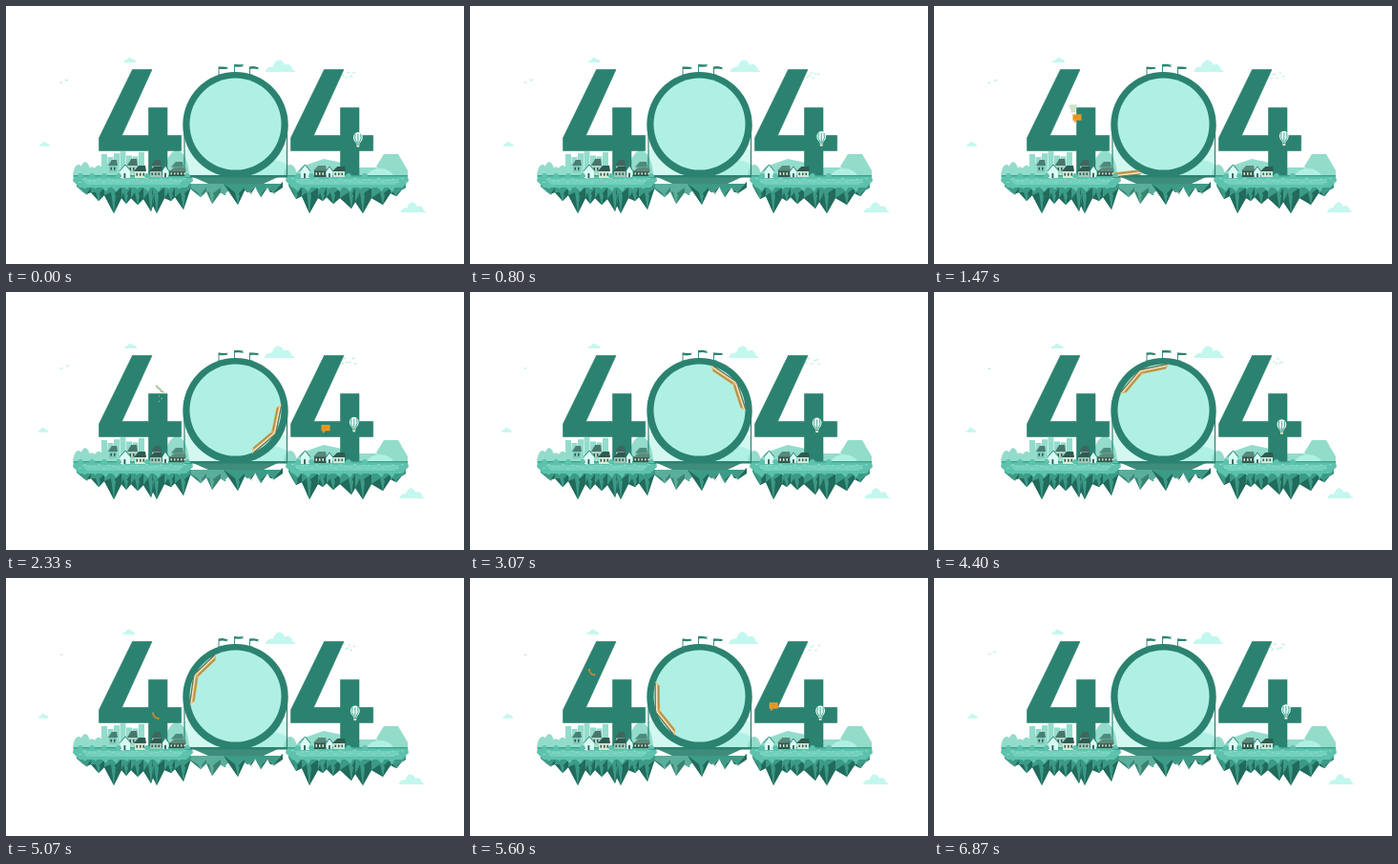
Recreate the animation shown at these times as an HTML page with a canvas. Size 480 px wide and 270 px high, loop 6.94 s.

```html
<!DOCTYPE html>
<html lang="en">
<head>
<meta charset="utf-8">
<title>404</title>
<style>
html, body { margin: 0; width: 100%; height: 100%; overflow: hidden; background: #fff; }
canvas { display: block; width: 480px; height: 270px; }
</style>
</head>
<body>
<canvas id="stage" width="480" height="270" role="img" aria-label="404"></canvas>
<script>
const LOOP = 6940, TAU = Math.PI * 2;
const c = document.getElementById('stage').getContext('2d');
const DARK = '#2b8270', DEEP = '#216a5c', ROCK = '#3c9a86', MID = '#5cc2ad', SOFT = '#93dccb',
      MINT = '#b0f0e4', PALE = '#c4f7ee', INK = '#2f5a51', CREAM = '#f2ead0', ORANGE = '#f09a24';

function poly(color, ...p) {
  c.fillStyle = color;
  c.beginPath();
  for (let i = 0; i < p.length; i += 2) c.lineTo(p[i], p[i + 1]);
  c.fill();
}
function rect(color, x, y, w, h) { c.fillStyle = color; c.fillRect(x, y, w, h); }
function oval(color, x, y, rx, ry = rx, from = 0, to = TAU) {
  c.fillStyle = color;
  c.beginPath();
  c.ellipse(x, y, rx, ry, 0, from, to);
  c.fill();
}
function dome(color, x, y, rx, ry) { oval(color, x, y, rx, ry, Math.PI, TAU); }
function line(color, width, ...p) {
  c.strokeStyle = color;
  c.lineWidth = width;
  c.beginPath();
  for (let i = 0; i < p.length; i += 2) c.lineTo(p[i], p[i + 1]);
  c.stroke();
}
function at(x, y, angle, draw) {
  c.save();
  c.translate(x, y);
  c.rotate(angle);
  draw();
  c.restore();
}

function cloud(x, y, w) {
  dome(PALE, x - w * .27, y, w * .2, w * .17);
  dome(PALE, x - w * .04, y, w * .22, w * .38);
  dome(PALE, x + w * .22, y, w * .18, w * .25);
  poly(PALE, x - w * .5, y, x - w * .32, y - w * .1, x + w * .35, y - w * .1, x + w * .5, y);
}
function clouds(a) {
  cloud(287.5 + Math.sin(a * 2), 69, 33);
  cloud(130 + Math.sin(a), 59, 14);
  cloud(39.5 + Math.cos(a), 146.5, 12);
  cloud(426 + Math.cos(a * 2), 216, 28);
}
function bird(x, y, size, flap) {
  line('#8ce0d0', .8, x - size, y - flap, x, y, x + size, y - flap);
}
function birds(t) {
  const flap = .8 + .7 * Math.sin(t / 90);
  bird(58, 80.5, 1.2, flap);
  if (t < 2900 || t > 6100) bird(63.5 + Math.sin(t / 1100), 78, 1.6, flap);
  for (let i = 0; i < 6; i++)
    bird(353 + i * 2.5 + Math.sin(t / 700 + i), 73 + 3 * Math.sin(i * 2.3 + t / 1100), 1, flap);
}

function backdrop() {
  for (let i = 0; i < 6; i++) dome(SOFT, 76 + i * 7, 179, 6, 13 + 3 * Math.sin(i * 2));
  for (let i = 0; i < 7; i++) rect(SOFT, 100 + i * 6.5, 155 + 3 * Math.sin(i * 1.7), 6, 24);
  rect('#d3f8f0', 187, 150, 107, 29);
  dome(SOFT, 179, 179, 13, 28);
  dome(MINT, 264, 179, 40, 20);
  dome(SOFT, 298, 179, 7, 13);
  poly(SOFT, 300, 179, 310, 168, 333, 160, 352, 164, 370, 169, 388, 169, 400, 179);
  poly('#93dcc9', 388, 168, 396, 155, 411, 155, 421, 172, 421, 179, 398, 179);
  dome(MINT, 392, 179, 14, 9);
}

function four(dx) {
  c.save();
  c.translate(dx, 0);
  const shape = [132.5, 66.5, 153, 66.5, 121.5, 135.5, 149.5, 135.5, 149.5, 106.5, 169, 106.5,
    169, 135.5, 183.7, 135.5, 183.7, 151.5, 169, 151.5, 169, 178, 149.5, 178, 149.5, 151.5,
    97.5, 151.5, 97.5, 138];
  poly(DARK, ...shape);
  line(DARK, .6, ...shape, 132.5, 66.5);
  c.restore();
}
function ring() {
  line(DARK, 1.2, 187, 124, 187, 180);
  line(DARK, 1.2, 294.5, 124, 294.5, 180);
  oval(DARK, 240.5, 124.3, 55.2);
  oval(MINT, 240.5, 123.6, 48);
}
function flag(x, y, t) {
  line(DARK, .9, x, y, x, 72);
  const w = .8 * Math.sin(t / 130 + x);
  poly(DARK, x, y, x + 4, y + w * .6, x + 10, y + .6 - w * .5, x + 8, y + 1.6,
    x + 10, y + 2.6 - w * .5, x + 4, y + 2.4 + w * .6, x, y + 2.6);
}

// Points alternate between notches and tips along the underside
function rock(color, facet, p) {
  poly(color, p[0], 186, ...p, p.at(-2), 186);
  for (let i = 2; i < p.length - 2; i += 4) {
    const [x, y, nx, ny] = p.slice(i, i + 4);
    poly(facet, x, y, nx, ny, nx, 190, x + 1, 196);
    poly(facet, x, y, p[i - 2], p[i - 1], x - 3, 195);
    poly(color, x, y, x - 2, 194, x + 2, 198);
  }
}
function island(x1, x2) {
  for (let x = x1 + 10; x < x2 - 8; x += 11)
    poly(MID, x - 6, 187, x + 6, 187, x + 2, 193 + 2 * Math.sin(x));
  poly(MID, x1, 178, x2, 178, x2 + 1, 183, x2 - 6, 190, x1 + 6, 190, x1 - 1, 183);
  poly('#72d0bc', x1 + 8, 181, x2 - 8, 181, x2 - 14, 187, x1 + 14, 187);
  rect('#3fa28d', x1, 177, x2 - x1, 1.4);
  for (let x = x1 + 5; x < x2 - 5; x += 5) rect(SOFT, x, 182 + 2 * Math.sin(x * 3), 3, .9);
}
function ground() {
  // Shadowed rocks joining the two islands
  rock('#5aae9c', '#3b8372', [188, 187, 204, 200, 210, 194, 216, 207, 225, 195, 229, 198, 237, 186]);
  rock(ROCK, DEEP, [228, 186, 243, 208, 250, 193, 256, 194, 261, 189, 267, 200, 274, 190, 280, 195, 290, 184]);
  poly('#3e8c7b', 196, 179, 285, 179, 270, 186, 212, 186);

  rock(ROCK, DEEP, [74, 189, 84, 197, 89, 195, 97, 204, 103, 198, 113, 217, 121, 201, 126, 207,
    131, 201, 138, 208, 144, 202, 152, 215, 154, 209, 158, 217, 166, 201, 173, 204, 177, 200, 186, 213, 194, 189]);
  rock(ROCK, DEEP, [296, 188, 304, 202, 310, 199, 318, 217, 327, 201, 332, 204, 336, 200, 343, 207,
    350, 201, 362, 212, 366, 205, 374, 217, 383, 201, 395, 208, 403, 196, 409, 199, 419, 188]);
  island(71, 195);
  island(294, 421);
  rect(DARK, 187, 177, 108, 2.5);
}

function house(x, y, w, h, wall, roof) {
  rect(wall, x, y + h * .4, w, h * .6);
  poly(roof, x - 1, y + h * .46, x + w * .35, y, x + w, y, x + w + 1, y + h * .46);
  for (let i = x + 1.5; i < x + w - 1; i += 3.5)
    rect(wall === INK ? CREAM : INK, i, y + h * .6, 1.5, h * .22);
}
function cottage(x, y, w, h) {
  rect('#d9fbf3', x, y + h * .4, w, h * .6);
  poly('#d9fbf3', x, y + h * .45, x + w / 2, y, x + w, y + h * .45);
  line(DARK, 1, x - 1, y + h * .48, x + w / 2, y, x + w + 1, y + h * .48);
  rect(INK, x + w * .35, y + h * .65, 1.8, h * .35);
}
function village() {
  house(108, 161, 8, 13, '#7fcbb9', '#4a7f72');
  house(128, 160, 9, 15, '#a9d4c4', '#4a766a');
  house(153, 161, 9, 14, '#92cbb9', '#3d675d');
  house(174, 163, 11, 12, '#77baa9', '#4d8c7d');
  cottage(120, 166, 10, 14);
  house(135, 167, 11, 13, '#d8e9d4', INK);
  house(151, 168, 12, 11, '#9fc7b4', INK);
  cottage(164, 167, 6, 12);
  house(171, 169, 17, 9, INK, '#5c8b7b');
  cottage(309, 166, 9, 14);
  house(323, 167, 12, 12, INK, '#5a897c');
  cottage(336, 168, 6, 11);
  house(343, 168, 12, 11, '#cbe8d7', INK);
  for (const x of [78, 90, 103, 118, 148, 190, 306, 320, 359, 376]) dome(MID, x, 179, 3, 4);
}

// Travel along the loop: [time, distance from its lowest point]
const RUN = [[1210, -84], [1470, -54], [2330, 48], [3800, 146], [5070, 197], [5600, 235], [6700, 378]];
const R = 46.5, TURN = TAU * R;
function slope(i) {
  const a = RUN[Math.max(0, i - 1)], b = RUN[Math.min(RUN.length - 1, i + 1)];
  return (b[1] - a[1]) / (b[0] - a[0]);
}
function travel(t) {
  const i = RUN.findIndex((k, n) => n < RUN.length - 1 && t >= k[0] && t < RUN[n + 1][0]);
  if (i < 0) return null;
  const [t0, s0] = RUN[i], [t1, s1] = RUN[i + 1], d = t1 - t0, u = (t - t0) / d;
  const ease = u * u * (3 - 2 * u);
  return s0 + (s1 - s0) * ease + d * u * (1 - u) * ((1 - u) * slope(i) - u * slope(i + 1));
}
function track(s) {
  if (s >= 0 && s <= TURN) return [240.5 + R * Math.sin(s / R), 123.6 + R * Math.cos(s / R)];
  const off = s < 0 ? s : s - TURN, k = Math.min(1, Math.abs(off) / 46);
  return [240.5 + off, 123.6 + R + 7 * k * k * (3 - 2 * k)];
}
function car(s, nose) {
  const [x1, y1] = track(s - 15), [x2, y2] = track(s + 15);
  at((x1 + x2) / 2, (y1 + y2) / 2, Math.atan2(y2 - y1, x2 - x1), () => {
    c.scale(nose, 1);
    poly('#d9a954', -15, -2.6, 11, -2.6, 16, 2, -15, 2);
    poly(CREAM, -15, .2, 13, .2, 15, 1.5, -15, 1.5);
    rect('#5f7355', -15, 1.6, 29, 1.2);
    rect('#9c8650', -13, -1.8, 24, .9);
  });
}
function train(t) {
  const s = travel(t);
  if (s === null) return;
  c.save();
  c.beginPath();
  c.rect(188, 68, 106, 113);
  c.clip();
  car(s - 15.5, -1);
  car(s + 15.5, 1);
  c.restore();
}

const ICONS = {
  bubble() {
    rect(ORANGE, -5, -4, 10, 7);
    poly(ORANGE, -4, 3, 0, 3, -3, 6);
    rect('#d98416', -3, -2, 6, .8);
    rect('#d98416', -3, 0, 4, .8);
  },
  cup() {
    poly('#cfe3c4', -5, -4, 5, -4, 3, 2, 1, 4, -1, 4, -3, 2);
    rect('#b3cdae', -3, 4, 6, 1);
  },
  note() {
    line('#a9c692', 2.2, -4, -4, -2, -1, 0, 0, 2, 3, 5, 4);
  },
  phone() {
    line('#d48b2a', 1.7, -3, -3, -2, 0, 0, 2, 3, 3);
    rect('#d48b2a', -4, -4, 2.2, 2.2);
    rect('#d48b2a', 2, 2, 2.2, 2.2);
  }
};
// Start time, start point, velocity in px/s
const FLOATS = [
  ['cup', 900, 168, 165, -39, -102],
  ['bubble', 1000, 165, 165, -32, -102],
  ['note', 1720, 172, 166, -18, -106],
  ['bubble', 2100, 333, 165, 9, -97],
  ['note', 3330, 336, 165, 6, -102],
  ['phone', 4830, 170, 165, -55, -86],
  ['bubble', 5260, 325, 165, -20, -91]
];
function floats(t) {
  for (const [kind, born, x, y, vx, vy] of FLOATS) {
    const age = (t - born) / 1000;
    if (age < 0 || age > .95) continue;
    c.globalAlpha = Math.min(1, age * 8, (.95 - age) * 6);
    at(x + vx * age, y + vy * age, 0, () => {
      c.scale(.9, .9);
      ICONS[kind]();
      if (kind === 'note' || kind === 'cup')
        for (let i = 0; i < 3; i++) rect('#d5dcb4', i % 2 * 3 - 1, 8 + i * 3, 1, 1);
    });
    c.globalAlpha = 1;
  }
}

function balloon(a) {
  at(366.2 + 2.7 * Math.cos(a), 138 - 1.5 * Math.sin(a), 0, () => {
    oval('#eafff9', 0, -.5, 4.9, 5.4);
    poly('#eafff9', -4.3, 2, 4.3, 2, 1.5, 6.5, -1.5, 6.5);
    for (const x of [-2.8, 0, 2.8]) line('#4aa794', 1, x, -4.2, x * 1.15, 1, x * .35, 6);
    line('#d9fbf3', .5, -1.3, 6, -1, 8);
    line('#d9fbf3', .5, 1.3, 6, 1, 8);
    rect(CREAM, -1.4, 7.6, 2.8, 2);
  });
}

function draw(t) {
  const a = t / LOOP * TAU;
  rect('#fff', 0, 0, 480, 270);
  clouds(a);
  backdrop();
  four(0);
  four(201);
  flag(223, 63.5, t);
  flag(239.5, 61, t);
  flag(255.5, 63.5, t);
  ring();
  ground();
  train(t);
  floats(t);
  village();
  birds(t);
  balloon(a);
}

const start = performance.now();
function tick() {
  draw((performance.now() - start) % LOOP);
  requestAnimationFrame(tick);
}
tick();
</script>
</body>
</html>
```
